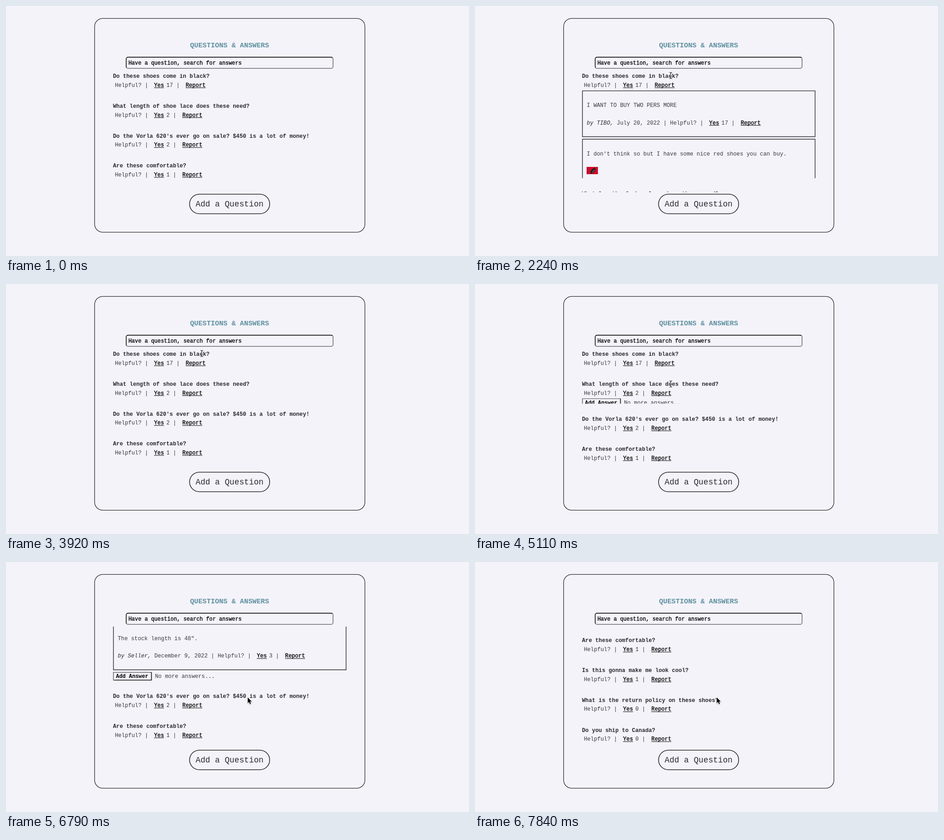
Recreate the animation shown at these times as an HTML page with a canvas. Size 1017 by 550 pixels, loop 8 s.

```html
<!DOCTYPE html>
<html lang="en">
<head>
<meta charset="utf-8">
<title>Questions and answers</title>
<style>
  html, body { margin: 0; width: 100%; height: 100%; overflow: hidden; background: #f4f3fa; }
  canvas { display: block; width: 1017px; height: 550px; }
</style>
</head>
<body>
<canvas id="stage"></canvas>
<script>
const W = 1017, H = 550, LOOP = 8000, STEP = 70;
const BG = '#f4f3fa', INK = '#2c2a30', SOFT = '#3a383e', TEAL = '#5f909f';
const BODY = 12.19, CONTROL = 11.85, PITCH = BODY * 0.6;
const FACE = '"Courier New", "Liberation Mono", monospace';

const LEFT = 235, FIRST = 154.3, ROW = 65.7, PANEL = 31.5, ACTIONS = 19.3;
const VIEW_TOP = 142, VIEW_BOTTOM = 409.5;

const questions = [
  { text: 'Do these shoes come in black?', yes: 17, answers: [
    { text: 'I WANT TO BUY TWO PERS MORE', by: 'TIBO', date: 'July 20, 2022', yes: 17, h: 101 },
    { text: "I don't think so but I have some nice red shoes you can buy.", by: 'Seller',
      date: 'July 21, 2022', yes: 2, h: 138, photo: true }
  ], open: 1925, loaded: 2030, close: 3342 },
  { text: 'What length of shoe lace does these need?', yes: 2, answers: [
    { text: 'The stock length is 48".', by: 'Seller', date: 'December 9, 2022', yes: 3, h: 101 }
  ], open: 4935, loaded: 5150, close: Infinity },
  { text: "Do the Vorla 620's ever go on sale? $450 is a lot of money!", yes: 2 },
  { text: 'Are these comfortable?', yes: 1 },
  { text: 'Is this gonna make me look cool?', yes: 1 },
  { text: 'What is the return policy on these shoes?', yes: 0 },
  { text: 'Do you ship to Canada?', yes: 0 }
];

// Pointer moves: start, end, then the points passed through
const moves = [
  [240, 770, [535, 451], [531, 330], [514, 245], [513.5, 198.5]],
  [1150, 1820, [513.5, 198.5], [490, 189], [438, 163], [430, 153]],
  [4160, 4830, [430, 153], [365, 205], [388, 262], [430, 220]],
  [5300, 5670, [430, 220], [455, 226], [500, 240], [513.5, 246]],
  [5960, 6230, [513.5, 246], [517, 262], [530, 285], [531, 298]]
];
const clicks = [[770, 513.5, 198.5, 20], [1820, 430, 153, 14.7], [4830, 430, 220, 14.7]];

const canvas = document.getElementById('stage');
const ctx = canvas.getContext('2d');
const dpr = window.devicePixelRatio || 1;
canvas.width = W * dpr;
canvas.height = H * dpr;

const clamp = v => Math.min(1, Math.max(0, v));
const smooth = (t, a, b) => { const u = clamp((t - a) / (b - a)); return u * u * (3 - 2 * u); };

// The CSS "ease" curve, solved by bisection
function ease(u) {
  u = clamp(u);
  let lo = 0, hi = 1;
  for (let i = 0; i < 20; i++) {
    const s = (lo + hi) / 2;
    if (0.75 * s * (1 - s) + s ** 3 < u) lo = s; else hi = s;
  }
  return 0.3 * lo * (1 - lo) ** 2 + 3 * lo * lo * (1 - lo) + lo ** 3;
}

function text(str, x, y, { size = BODY, style = '', color = SOFT, heavy = 0, align = 'left' } = {}) {
  ctx.font = `${style} ${size}px ${FACE}`;
  ctx.textAlign = align;
  ctx.fillStyle = ctx.strokeStyle = color;
  ctx.fillText(str, x, y);
  if (heavy) {
    ctx.lineWidth = heavy;
    ctx.strokeText(str, x, y);
  }
}

function link(str, x, y) {
  text(str, x, y, { color: '#000', heavy: 0.35 });
  ctx.fillRect(x, y + 1.6, str.length * PITCH, 1);
}

function outline(x, y, w, h, r, width) {
  ctx.beginPath();
  ctx.roundRect(x, y, w, h, r);
  ctx.strokeStyle = INK;
  ctx.lineWidth = width;
  ctx.stroke();
}

// Two-tone border: one colour for top and left, one for bottom and right
function bevel(x, y, w, h, r, width, near, far) {
  [[near, x, y], [far, x + w, y + h]].forEach(([color, cx, cy]) => {
    ctx.save();
    ctx.beginPath();
    ctx.moveTo(x - 2, y + h + 2);
    ctx.lineTo(x + r, y + h - r);
    ctx.lineTo(x + w - r, y + r);
    ctx.lineTo(x + w + 2, y - 2);
    ctx.lineTo(cx === x ? x - 2 : cx + 2, cy === y ? y - 2 : cy + 2);
    ctx.clip();
    ctx.beginPath();
    ctx.roundRect(x, y, w, h, r);
    ctx.strokeStyle = color;
    ctx.lineWidth = width;
    ctx.stroke();
    ctx.restore();
  });
}

function votes(x, y, count) {
  const n = String(count);
  const end = x + 113 + n.length * PITCH;
  text('Helpful? |', x, y);
  link('Yes', x + 86, y);
  text(n + ' |', x + 113, y);
  link('Report', end + 2 * PITCH + 13.2, y);
}

function photo(x, y) {
  ctx.fillStyle = '#cf0c2a';
  ctx.fillRect(x, y, 24.5, 16);
  ctx.fillStyle = '#9c0f22';
  ctx.fillRect(x, y, 1.2, 16);
  ctx.save();
  ctx.translate(x + 13.5, y + 8.5);
  ctx.rotate(-0.85);
  ctx.fillStyle = '#2b1d20';
  ctx.beginPath();
  ctx.ellipse(0, 0, 7.5, 3.6, 0, 0, 7);
  ctx.fill();
  ctx.fillStyle = '#8d8284';
  ctx.fillRect(-4, 0.6, 8, 1.2);
  ctx.restore();
}

function answer(a, y) {
  outline(236, y, 511, a.h, 0, 1.4);
  text(a.text, 245.5, y + 35.8);
  if (a.photo) photo(245.5, y + 61);
  const line = y + a.h - 27;
  const by = `by ${a.by}, `;
  text(by, 245.5, line, { style: 'italic', color: INK });
  text(a.date + ' |', 245.5 + by.length * PITCH, line);
  votes(245.5 + (by.length + a.date.length + 3) * PITCH, line, a.yes);
}

function actions(y) {
  bevel(236, y + 0.7, 83.5, 17, 0, 1.6, '#6b6a70', '#0c0c0e');
  text('Add Answer', 241.6, y + 13.1, { size: CONTROL, style: 'bold', color: '#000' });
  text('No more answers...', 327.2, y + 13.3);
}

function panelHeight(q, t) {
  if (!q.answers || t < q.open) return 0;
  const full = ACTIONS + q.answers.reduce((sum, a) => sum + a.h + 5.5, 0);
  const empty = at => ACTIONS * ease((at - q.open) / 500);
  if (t < q.loaded) return empty(t);
  const from = empty(q.loaded);
  const h = from + (full - from) * ease((t - q.loaded) / 500);
  return h * (1 - ease((t - q.close) / 500));
}

function panel(q, y, h, t) {
  ctx.save();
  ctx.beginPath();
  ctx.rect(230, y, 522, h);
  ctx.clip();
  let at = y;
  if (t >= q.loaded) {
    q.answers.forEach(a => {
      answer(a, at + 0.7);
      at += a.h + 5.5;
    });
  }
  actions(at);
  ctx.restore();
}

function list(t) {
  const scroll = 138.7 * smooth(t, 6385, 6930) + 166 * smooth(t, 7225, 7840);
  ctx.save();
  ctx.beginPath();
  ctx.rect(200, VIEW_TOP, 580, VIEW_BOTTOM - VIEW_TOP);
  ctx.clip();
  let y = FIRST - scroll;
  questions.forEach(q => {
    const h = panelHeight(q, t);
    text(q.text, LEFT, y + 3.9, { style: 'bold', color: INK });
    votes(239.2, y + 23.5, q.yes);
    if (h > 0) panel(q, y + PANEL, h, t);
    y += ROW + h;
  });
  ctx.restore();
}

function frame() {
  outline(194.6, 27.3, 593.8, 470.4, 18, 1.3);
  text('QUESTIONS & ANSWERS', 491, 91, { size: 15.24, style: 'bold', color: TEAL, align: 'center' });
  bevel(264, 112.6, 454.4, 24.6, 4, 1.6, '#0c0c0e', '#6b6a70');
  text('Have a question, search for answers', 268.9, 129,
    { size: CONTROL, color: '#000', heavy: 0.35 });
  outline(403.2, 414, 176, 43, 21.5, 1.6);
  text('Add a Question', 491.1, 441.4, { size: 17.78, color: INK, align: 'center' });
}

function pointerAt(t) {
  const move = moves.filter(m => t >= m[0]).pop();
  const [start, end, a, b, c, d] = move;
  const s = smooth(t, start, end), r = 1 - s;
  return [0, 1].map(i =>
    r ** 3 * a[i] + 3 * r * r * s * b[i] + 3 * r * s * s * c[i] + s ** 3 * d[i]);
}

function arrow() {
  ctx.beginPath();
  [[0, 0], [0, 12.4], [2.8, 9.8], [4.9, 14.4], [7, 13.5], [5, 9], [8.8, 9]]
    .forEach(p => ctx.lineTo(...p));
  ctx.closePath();
  ctx.save();
  ctx.shadowColor = 'rgba(0,0,0,.35)';
  ctx.shadowBlur = 2 * dpr;
  ctx.shadowOffsetY = dpr;
  ctx.strokeStyle = '#fff';
  ctx.lineWidth = 1.5;
  ctx.stroke();
  ctx.restore();
  ctx.fillStyle = '#000';
  ctx.fill();
}

function beam() {
  ctx.beginPath();
  [-1, 1].forEach(k => {
    ctx.moveTo(-3, 7 * k);
    ctx.quadraticCurveTo(0, 7 * k, 0, 4.5 * k);
    ctx.quadraticCurveTo(0, 7 * k, 3, 7 * k);
  });
  ctx.moveTo(0, -5);
  ctx.lineTo(0, 5);
  ctx.moveTo(-1.6, 2);
  ctx.lineTo(1.6, 2);
  [['rgba(255,255,255,.8)', 2.4], ['#111', 1.1]].forEach(([color, width]) => {
    ctx.strokeStyle = color;
    ctx.lineWidth = width;
    ctx.stroke();
  });
}

function pointer(t) {
  if (t < 280) return;
  const [x, y] = pointerAt(t);
  const onText = t < 5600 &&
    (Math.abs(y - FIRST) < 8 && x < 447 || Math.abs(y - FIRST - ROW) < 8 && x < 535);
  ctx.save();
  ctx.translate(x, y);
  if (onText) beam(); else arrow();
  ctx.restore();
  clicks.filter(c => t >= c[0] && t < c[0] + 140).forEach(([, cx, cy, r]) => {
    ctx.beginPath();
    ctx.arc(cx, cy, r, 0, 7);
    ctx.strokeStyle = '#111';
    ctx.lineWidth = 1.3;
    ctx.stroke();
  });
}

function draw() {
  const now = performance.now() % LOOP;
  const t = Math.floor(now / STEP) * STEP;
  ctx.setTransform(dpr, 0, 0, dpr, 0, 0);
  ctx.fillStyle = BG;
  ctx.fillRect(0, 0, W, H);
  list(t);
  frame();
  pointer(t);
  requestAnimationFrame(draw);
}
draw();
</script>
</body>
</html>
```
